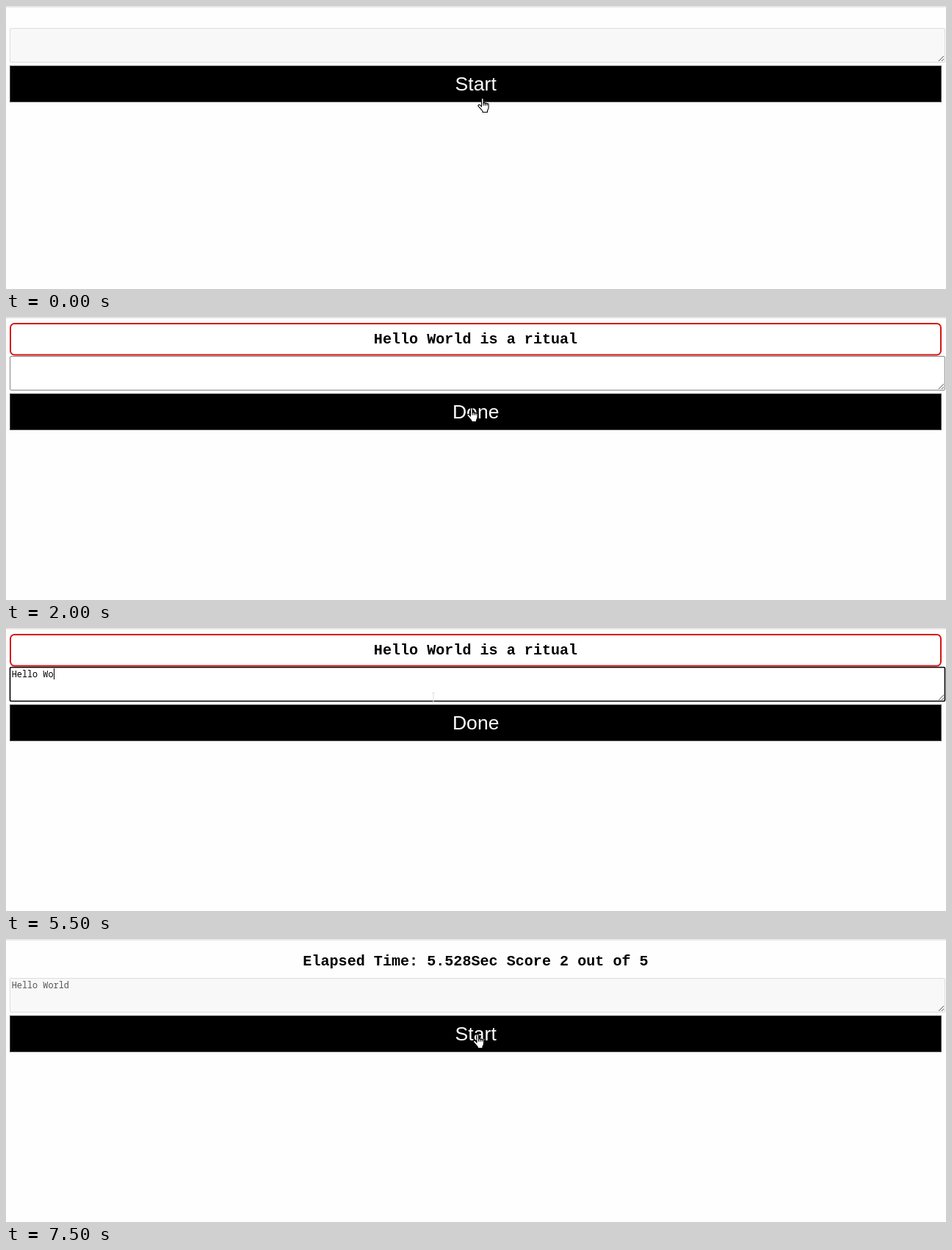
An HTML page that plays this animation: 1280 px wide and 385 px high, repeating every 8000 ms.

```html
<!DOCTYPE html>
<html lang="en">
<head>
<meta charset="utf-8">
<title>Typing test</title>
<style>
  html, body { margin: 0; width: 100%; height: 100%; overflow: hidden; background: #fefefe; }
  svg { display: block; }
  text { white-space: pre; }
  #heading { font: bold 20.1px "Liberation Mono", "Courier New", monospace; }
  #label { font: 26.6px "Liberation Sans", Arial, sans-serif; fill: #fff; }
  #typed { font: 11.85px "Noto Sans Mono", "DejaVu Sans Mono", monospace; }
</style>
</head>
<body>
<svg width="1280" height="385" viewBox="0 0 1280 385">
  <rect width="1280" height="2" fill="#e7e7e7"/>
  <rect id="frame" x="6" y="9" width="1267" height="42.5" rx="5.5" fill="#fff" stroke="#d81414" stroke-width="2"/>
  <text id="heading" x="639.5" y="36" text-anchor="middle"></text>
  <g id="form">
    <rect id="area" x="5.5" y="30.5" width="1273" height="46" rx="1.5"/>
    <path d="M1270 75l7-7M1274 75l3-3" stroke="#555"/>
    <text id="typed" x="7.7" y="44"></text>
    <rect id="caret" y="32" width="1" height="15"/>
    <rect x="5.5" y="81.5" width="1268" height="49" stroke="#555"/>
    <text id="label" x="639.7" y="115" text-anchor="middle"></text>
  </g>
  <g id="hand" fill="#fff" stroke="#000" stroke-width="1.1" stroke-linejoin="round">
    <path d="M5.5 13V2.2q1.3-1.6 2.6 0V8q1.4-1 2.4.4q1.5-.8 2.4.5q1.9-.6 2.2 1V14q0 2-1.6 4.4V20.5H7V19Q4 15.5 1 12.2Q.6 10.4 2.4 10.3Q4 10.6 5.5 13Z"/>
    <path d="M8.1 8v3.5M10.5 8.4v3.1M12.9 8.9v2.6" fill="none"/>
  </g>
  <path id="arrow" d="M.5 .5V16L4 12.7L6.3 18.2L8.8 17.1L6.5 11.8H11.5Z" fill="#fff" stroke="#000"/>
  <path id="beam" d="M-2 .5H2M0 .5V13M-2 13H2" fill="none" stroke="#dedede"/>
</svg>
<script>
const $ = id => document.getElementById(id);
const LOOP = 8000, PITCH = 7.1, PHRASE = "Hello World ";

// Each row: start time, then its values
const pointer = [
  [0, "hand", 642, 124], [250, "hand", 644, 107], [1500, "arrow", 645, 146],
  [1750, "hand", 628, 127], [2000, "hand", 627, 122], [2250, "hand", 479, 107],
  [2500, "beam", 582, 88], [7000, "hand", 635.5, 128]
];
const typing = [
  [0, 0], [3750, 2], [4250, 4], [4750, 6], [5500, 8], [5750, 10], [6000, 11], [6750, 12]
];
const caretOn = [[2500, 3000], [4000, 5000], [5500, 6500], [6750, 7250]];

const at = (rows, t) => rows.filter(row => row[0] <= t).pop().slice(1);
const within = (t, [from, to]) => t >= from && t < to;
const show = (id, on) => $(id).setAttribute("visibility", on ? "visible" : "hidden");
const move = (id, x, y) => $(id).setAttribute("transform", `translate(${x} ${y})`);
const write = (id, text) => { if ($(id).textContent !== text) $(id).textContent = text; };
const style = (id, attrs) => {
  for (const name in attrs) $(id).setAttribute(name, attrs[name]);
};

function draw(t) {
  const started = t >= 2000;
  const running = within(t, [2000, 7500]);
  const focused = within(t, [2500, 7250]);

  show("frame", running);
  write("heading", running ? "Hello World is a ritual"
    : started ? "Elapsed Time: 5.528Sec Score 2 out of 5" : "");
  write("label", running ? "Done" : "Start");
  move("form", 0, started ? 23 : 0);
  style("area", {
    fill: running ? "#fff" : "#f8f8f8",
    stroke: focused ? "#000" : running ? "#858585" : "#dcdcdc",
    "stroke-width": focused ? 1.6 : 1
  });

  const [count] = at(typing, t);
  write("typed", PHRASE.slice(0, count));
  style("typed", { fill: running ? "#000" : "#555" });
  style("caret", { x: Math.round(8 + count * PITCH) });
  show("caret", caretOn.some(span => within(t, span)));

  const [kind, x, y] = at(pointer, t);
  for (const id of ["hand", "arrow", "beam"]) show(id, id === kind);
  move(kind, x, y);
}

const start = performance.now();
function tick() {
  draw((performance.now() - start) % LOOP);
  requestAnimationFrame(tick);
}
tick();
</script>
</body>
</html>
```
